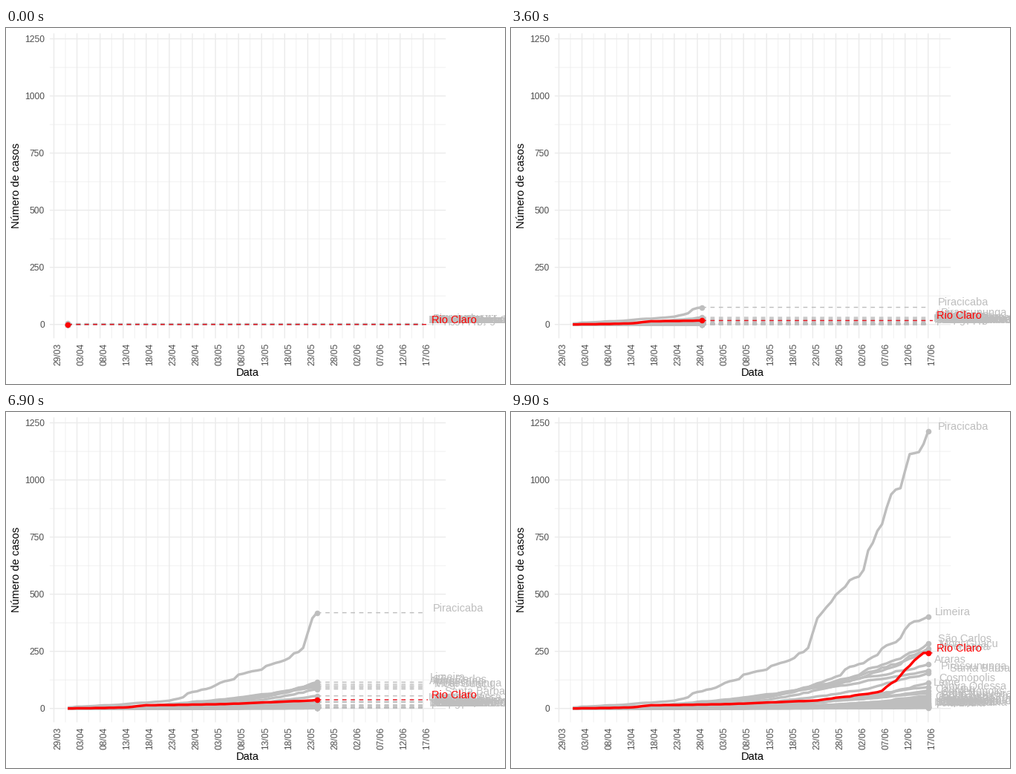
Recreate the animation shown at these times as a matplotlib script. Size 672 by 480 pixels, loop 10 s.

```python
import numpy as np
import matplotlib
import matplotlib.pyplot as plt
from matplotlib.animation import FuncAnimation

matplotlib.rcParams["path.snap"] = False
matplotlib.rcParams["font.family"] = "Liberation Sans"

W, H, DPI = 672, 480, 96
FRAMES, LAST = 100, 77
GREY, RED, DASH_RED = "#bebebe", "#ff0000", "#e6101c"
PX = 72 / DPI

# panel geometry in pixels
LEFT, RIGHT, TOP, BOTTOM = 58.9, 592.2, 7.3, 418.4

days = np.arange(LAST + 1)
rng = np.random.default_rng(4)


def day_x(day):
    return 83.15 + 6.216 * np.asarray(day, float)


def case_y(cases):
    return 399.7 - 0.3081 * np.asarray(cases, float)


def stepped(key_days, key_cases):
    """Daily counts through key points, rising in uneven steps between them."""
    clock = np.append(0, np.cumsum(rng.gamma(4, size=LAST)))
    return np.rint(np.interp(clock, clock[list(key_days)], key_cases))


def growth(final, power):
    key_days = days[::11]
    return stepped(key_days, final * (key_days / LAST) ** power)


# name: cases on the last day, steepness
large = {
    "Limeira": (402, 3.5), "São Carlos": (285, 2.9), "Mogi Guaçu": (262, 3.2),
    "Americana": (250, 2.6), "Araras": (193, 2.0), "Pirassununga": (165, 1.7),
    "Santa Bárbara d'Oeste": (155, 3.0),
}
small = [
    "Cosmópolis", "Leme", "Nova Odessa", "Capivari", "Cordeirópolis",
    "Artur Nogueira", "Porto Ferreira", "Conchal", "Descalvado", "Rio das Pedras",
    "Iracemápolis", "São Pedro", "Engenheiro Coelho", "Santa Gertrudes",
    "Charqueada", "Itirapina", "Ipeúna", "Saltinho", "Santa Maria da Serra",
    "Corumbataí", "Analândia",
]

cities = {"Piracicaba": stepped((0, 22, 34, 42, 51, 53, 62, 67, 73, 75, 77),
                                (4, 34, 119, 170, 265, 395, 577, 806, 1113, 1122, 1213))}
cities |= {name: growth(*rule) for name, rule in large.items()}
cities |= {name: growth(112 * 0.835 ** i, 4 - 0.6 * (i % 4))
           for i, name in enumerate(small)}
cities["Rio Claro"] = stepped((0, 12, 17, 34, 54, 67, 70, 76, 77),
                              (0, 4, 14, 19, 38, 77, 121, 243, 243))

fig = plt.figure(figsize=(W / DPI, H / DPI), dpi=DPI, facecolor="white")
ax = fig.add_axes([0, 0, 1, 1])
ax.set_xlim(0, W)
ax.set_ylim(H, 0)
ax.axis("off")


def grid(xs, ys, width, z):
    style = dict(colors="#ebebeb", lw=width * PX, zorder=z)
    ax.vlines(xs, TOP, BOTTOM, **style)
    ax.hlines(ys, LEFT, RIGHT, **style)


def write(x, y, text, size, color="black", ha="center", rotation=0):
    return ax.text(x, y, text, size=size, color=color, ha=ha, va="baseline",
                   rotation=rotation, rotation_mode="anchor")


tick_days = np.arange(-3, LAST + 1, 5)
tick_cases = np.arange(0, 1251, 250)
grid(day_x(tick_days + 2.5), case_y(tick_cases[:-1] + 125), 0.71, 0)
grid(day_x(tick_days), case_y(tick_cases), 1.42, 1)

for d in tick_days:
    date = str(np.datetime64("2020-04-01") + int(d))
    write(day_x(d) + 8.6, 440, f"{date[8:]}/{date[5:7]}", 9, "#4d4d4d", rotation=90)
for c in tick_cases:
    write(52, case_y(c) + 4.3, str(c), 9, "#4d4d4d", ha="right")
write(325.6, 468.8, "Data", 11)
write(18, 212, "Número de casos", 11, rotation=90)


class City:
    def __init__(self, name, cases):
        self.cases = cases
        own = name == "Rio Claro"
        color, z = (RED, 10) if own else (GREY, 2)
        self.end = day_x(LAST + own)
        self.dash, = ax.plot([], [], color=DASH_RED if own else GREY, lw=1.42 * PX,
                             ls=(0, (4, 4)), zorder=z)
        self.line, = ax.plot([], [], color=color, lw=3.4 * PX, zorder=z + 1,
                             solid_capstyle="butt", solid_joinstyle="round")
        self.dot, = ax.plot([], [], "o", color=color, ms=7.6 * PX, mew=0, zorder=z + 2)
        self.label = write(0, 0, name, 10.9, color, ha="left")
        self.label.set_zorder(z + 3)
        # labels stand off by a fifth of their own width
        width = self.label.get_window_extent().width
        self.label.set_x(day_x(LAST) - 0.8 + 0.2 * width)

    def show(self, day):
        past = days[days < day]
        x, y = day_x(day), case_y(np.interp(day, days, self.cases))
        self.line.set_data(np.append(day_x(past), x),
                           np.append(case_y(self.cases[past]), y))
        self.dash.set_data([x, self.end], [y, y])
        self.dot.set_data([x], [y])
        self.label.set_y(y - 2.1)
        return self.dash, self.line, self.dot, self.label


plots = [City(name, cases) for name, cases in cities.items()]
# each day lands on a whole frame; gaps are filled linearly
day_frames = np.rint(days * (FRAMES - 1) / LAST)


def update(frame):
    day = np.interp(frame, day_frames, days)
    return [artist for city in plots for artist in city.show(day)]


anim = FuncAnimation(fig, update, frames=FRAMES, interval=100, repeat=True,
                     repeat_delay=0, blit=False)
plt.show()
```
